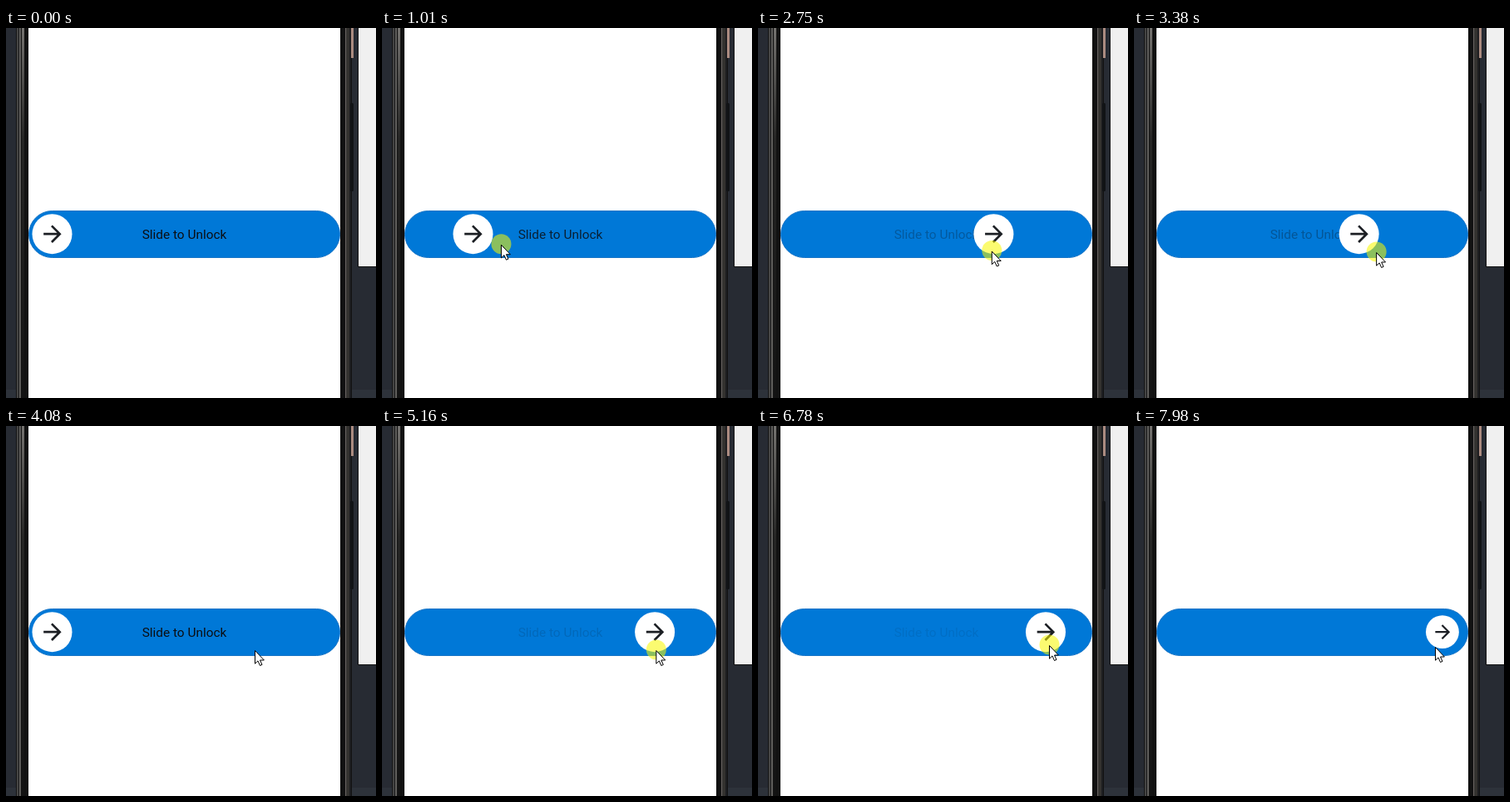
Recreate the animation shown at these times as an HTML page. Size 445 by 444 pixels, loop 8 s.

```html
<!DOCTYPE html>
<html lang="en">
<head>
<meta charset="utf-8">
<title>Slide to Unlock</title>
<style>
  html, body { margin: 0; width: 100%; height: 100%; overflow: hidden; background: #272b33; }
  svg { display: block; width: 100%; height: 100%; }
  text { font: 15.4px Roboto, Arial, sans-serif; text-anchor: middle; }
</style>
</head>
<body>
<svg viewBox="0 0 445 444">
  <defs>
    <linearGradient id="sheen" x2="0" y2="1">
      <stop offset="0" stop-color="#74726f"/>
      <stop offset=".3" stop-color="#262625"/>
      <stop offset="1" stop-color="#131313"/>
    </linearGradient>
  </defs>

  <!-- desktop and phone body -->
  <rect width="445" height="444" fill="#272b33"/>
  <rect y="434" width="445" height="10" fill="#2d323a"/>
  <rect x="12" width="404" height="444" fill="#111"/>
  <rect x="13" width="1.5" height="444" fill="#565554"/>
  <rect x="14.5" width="1.5" height="444" fill="#2a2a2a"/>
  <rect x="16" width="2" height="444" fill="#5c5b59"/>
  <rect x="19" width="3" height="444" fill="url(#sheen)"/>
  <rect x="408" width="1.5" height="444" fill="#65615e"/>
  <rect x="410" width="3" height="444" fill="#34322f"/>
  <rect x="413" width="2" height="444" fill="#1d1e21"/>
  <rect x="415" width="3" height="36" fill="#ab8b80"/>
  <rect x="414" y="90" width="4" height="106" rx="1.5" fill="#111316"/>
  <rect x="423.5" y="-1" width="24" height="287.5" fill="#f0f0f0" stroke="#111"/>
  <rect x="27" width="375" height="444" fill="#fff"/>

  <!-- slider -->
  <rect x="27.5" y="219.5" width="374" height="56" rx="28" fill="#0078d7" stroke="#1674c6"/>
  <text id="label" x="214.5" y="253" fill="#0b0f14">Slide to Unlock</text>
  <g id="knob">
    <circle r="24" fill="#fff"/>
    <path transform="translate(.4 0) scale(1.34) translate(-12 -12)" fill="#1c1f24"
      d="M12 4l-1.41 1.41L16.17 11H4v2h12.17l-5.58 5.59L12 20l8-8z"/>
  </g>

  <!-- pointer -->
  <g id="pointer">
    <circle id="press" cx="-.5" cy="-.5" r="12" fill="#f8f800" opacity=".56"/>
    <path d="M-.5 .5V16.2L3 12.9L5.5 18.5L8 17.4L5.5 12H10.4Z" fill="#fff" stroke="#000"/>
  </g>
</svg>
<script>
const LOOP = 8000, START = 55.5, END = 375, KNOB_Y = 247.2, RADIUS = 24;
const LAG = 65, RETURN = 250;
const el = id => document.getElementById(id);
const label = el('label'), knob = el('knob'), pointer = el('pointer'), press = el('press');

const clamp = u => Math.min(1, Math.max(0, u));
const mix = (a, b, u) => a + (b - a) * u;
const smooth = u => u * u * (3 - 2 * u);
const easeOut = u => u * (2 - u);

// Pointer moves; it rests between them.
const ENTER = { x: 385, y: 444, from: 170 };
const moves = [
  { from: 170, to: 680, x: 68, y: 257 },
  { from: 800, to: 2080, x: 319, y: 266, ease: easeOut },
  { from: 2500, to: 3000, x: 245, y: 269 },
  { from: 3000, to: 3500, x: 300, y: 269 },
  { from: 4100, to: 4580, x: 68, y: 257 },
  { from: 4650, to: 5020, x: 347, y: 267 },
  { from: 5020, to: 5250, x: 322, y: 270 },
  { from: 5250, to: 5480, x: 334, y: 274 },
  { from: 5560, to: 5980, x: 60.5, y: 250 },
  { from: 6250, to: 6620, x: 351, y: 263 },
  { from: 6780, to: 6920, x: 363, y: 265 }
];

// Drags: the knob trails the pointer, then slides home or locks.
const drags = [
  { down: 740, up: 3830, rest: START },
  { down: 4610, up: 5500, rest: START },
  { down: 6200, up: 7430, rest: END }
];

function pointerAt(t) {
  let { x, y } = ENTER;
  for (const m of moves) {
    const u = (m.ease || smooth)(clamp((t - m.from) / (m.to - m.from)));
    x = mix(x, m.x, u);
    y = mix(y, m.y, u);
  }
  return { x, y };
}

function knobAt(t, drag) {
  if (!drag) return START;
  const grab = pointerAt(drag.down).x - START;
  const held = pointerAt(Math.min(t, drag.up) - LAG).x - grab;
  return mix(held, drag.rest, clamp((t - drag.up) / RETURN));
}

function draw(t) {
  const drag = drags.filter(d => t >= d.down).pop();
  const x = knobAt(t, drag);
  const scale = mix(1, .83, clamp((t - 7780) / 200));
  const left = x - RADIUS * (1 - scale);
  const p = pointerAt(t);
  knob.setAttribute('transform', `translate(${left} ${KNOB_Y}) scale(${scale})`);
  label.setAttribute('opacity', 1 - clamp((x - START) / (END - START)));
  pointer.setAttribute('transform', `translate(${p.x} ${p.y})`);
  pointer.setAttribute('visibility', t < ENTER.from ? 'hidden' : 'visible');
  press.setAttribute('display', drag && t < drag.up ? 'inline' : 'none');
}

const begin = performance.now();
function tick() {
  draw((performance.now() - begin) % LOOP);
  requestAnimationFrame(tick);
}
tick();
</script>
</body>
</html>
```
